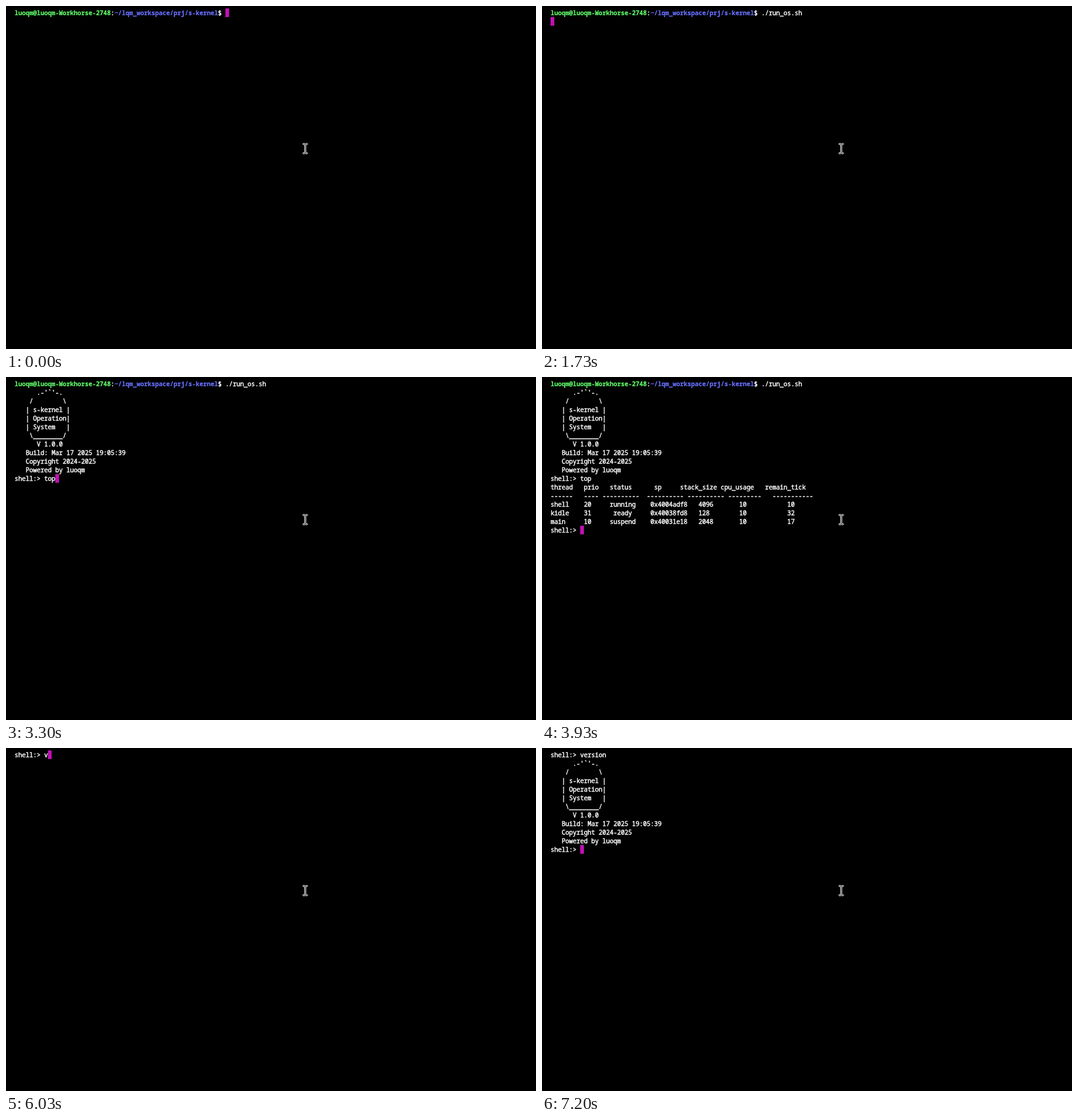
These frames come from a looping animation (860 px wide and 558 px high, 8000 ms). An HTML page with a canvas:

```html
<!DOCTYPE html>
<html lang="en">
<head>
<meta charset="utf-8">
<title>Kernel shell session</title>
<style>
  html, body { margin: 0; width: 100%; height: 100%; overflow: hidden; background: #000; }
  canvas { display: block; }
</style>
</head>
<body>
<canvas id="stage" width="860" height="558"></canvas>
<script>
const ctx = document.getElementById("stage").getContext("2d", { alpha: false });
const LOOP = 8000;
const CELL_W = 6, CELL_H = 14, LEFT = 14, TOP = 4;
const FONT = '10px "Noto Sans Mono", "DejaVu Sans Mono", monospace';
const COLORS = { text: "#ffffff", user: "#5ffa68", path: "#6871ff", cursor: "#c010b4" };

const USER = "luoqm@luoqm-Workhorse-2748";
const PATH = "~/lqm_workspace/prj/s-kernel";
const COMMAND_COL = USER.length + PATH.length + 3;
const PROMPT = "shell:> ";

const BANNER = [
  "      .-'`'-.",
  "    /        \\",
  "   | s-kernel |",
  "   | Operation|",
  "   | System   |",
  "    \\________/",
  "      V 1.0.0",
  "   Build: Mar 17 2025 19:05:39",
  "   Copyright 2024-2025",
  "   Powered by luoqm"
];

// Places each word at its column.
const columns = (cols, words) =>
  words.reduce((line, word, i) => line.padEnd(cols[i]) + word, "");

const threadRow = (name, prio, status, statusCol, sp, size, ticks) =>
  columns([0, 9, statusCol, 27, 40, 51, 64], [name, prio, status, sp, size, "10", ticks]);

const TABLE = [
  columns([0, 9, 16, 28, 35, 46, 58],
    ["thread", "prio", "status", "sp", "stack_size", "cpu_usage", "remain_tick"]),
  columns([0, 9, 14, 26, 37, 48, 60], [6, 4, 10, 10, 10, 9, 11].map(n => "-".repeat(n))),
  threadRow("shell", "20", "running", 16, "0x4004adf8", "4096", "10"),
  threadRow("kidle", "31", "ready", 17, "0x40038fd8", "128", "32"),
  threadRow("main", "10", "suspend", 16, "0x40031e18", "2048", "17")
];

// Each entry is [time, typed text so far].
const LAUNCH = [[900, "."], [1030, "./"], [1230, "./r"], [1330, "./ru"], [1430, "./run"], [1530, "./run_os.sh "]];
const TOP_KEYS = [[3000, "t"], [3200, "to"], [3300, "top"]];
const CLEAR_KEYS = [[4600, "c"], [4700, "cl"], [4800, "cle"], [4900, "clea"], [5000, "clear"]];
const VERSION_KEYS = [[6030, "v"], [6130, "ve"], [6330, "ver"], [6500, "vers"],
  [6700, "versi"], [6900, "versio"], [7100, "version"]];
const RUN = 1730, BOOTED = 2000, TOP_DONE = 3530, CLEARED = 5130, VERSION_DONE = 7200;

const typed = (keys, t) => keys.reduce((text, [at, value]) => t >= at ? value : text, "");

function screenAt(t) {
  const launch = " ".repeat(COMMAND_COL) + typed(LAUNCH, t);
  if (t < RUN) return [launch];
  if (t < BOOTED) return [launch, ""];
  const booted = [launch, ...BANNER];
  if (t < TOP_DONE) return [...booted, PROMPT + typed(TOP_KEYS, t)];
  if (t < CLEARED) return [...booted, PROMPT + "top", ...TABLE, PROMPT + typed(CLEAR_KEYS, t)];
  const version = PROMPT + typed(VERSION_KEYS, t);
  return t < VERSION_DONE ? [version] : [version, ...BANNER, PROMPT];
}

// A thin outline gives the regular weight its heavier screen look.
function write(text, col, row, color = COLORS.text, bold = false) {
  const x = LEFT + col * CELL_W, y = TOP + 11 + row * CELL_H;
  ctx.font = (bold ? "bold " : "") + FONT;
  ctx.fillStyle = ctx.strokeStyle = color;
  ctx.lineWidth = bold ? 0.2 : 0.45;
  ctx.lineJoin = "round";
  ctx.fillText(text, x, y);
  ctx.strokeText(text, x, y);
}

function drawHostPrompt() {
  write(USER, 0, 0, COLORS.user, true);
  write(":", USER.length, 0);
  write(PATH, USER.length + 1, 0, COLORS.path, true);
  write("$", COMMAND_COL - 2, 0);
}

function drawPointer() {
  const box = (color, x, y, w, h) => {
    ctx.fillStyle = color;
    ctx.fillRect(x, y, w, h);
  };
  for (const y of [223, 238]) {
    for (const x of [481, 485]) {
      box("#fff", x + 1, y, 3, 3);
      box("#fff", x, y + 1, 5, 1);
    }
  }
  box("#fff", 484, 225, 3, 14);
  for (const y of [224, 239]) {
    box("#000", 482, y, 3, 1);
    box("#000", 486, y, 3, 1);
  }
  box("#000", 485, 225, 1, 14);
}

function draw(t) {
  ctx.fillStyle = "#000";
  ctx.fillRect(0, 0, 860, 558);
  if (t < CLEARED) drawHostPrompt();

  const lines = screenAt(t);
  lines.forEach((line, row) => {
    const text = line.trimStart();
    write(text, line.length - text.length, row);
  });
  const row = lines.length - 1;
  ctx.fillStyle = COLORS.cursor;
  ctx.fillRect(LEFT + lines[row].length * CELL_W, TOP + row * CELL_H, CELL_W, CELL_H);
  drawPointer();
}

const start = performance.now();
function frame() {
  draw((performance.now() - start) % LOOP);
  requestAnimationFrame(frame);
}
frame();
</script>
</body>
</html>
```
